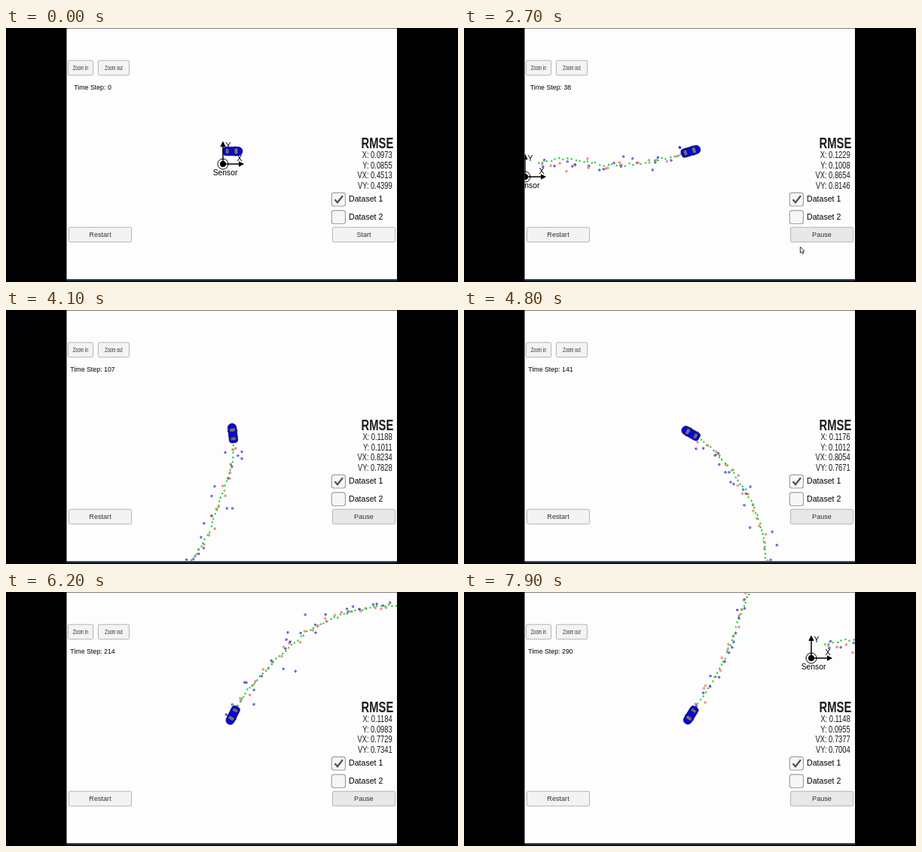
Animation of 600x338 px, one loop 8 s. Source, as an HTML page with a canvas:

```html
<!DOCTYPE html>
<html lang="en">
<head>
<meta charset="utf-8">
<title>Sensor fusion tracker</title>
<style>
html, body { margin: 0; width: 100%; height: 100%; overflow: hidden; background: #000; }
canvas { display: block; }
</style>
</head>
<body>
<canvas id="stage" width="600" height="338"></canvas>
<script>
const ctx = document.getElementById('stage').getContext('2d');
const LOOP = 8000, CAR = [301, 164], TAU = Math.PI * 2;
const SANS = '"Liberation Sans", Arial, sans-serif';

// time, step, RMSE of X, Y, VX, VY
const KEYS = [
  [1920, 0, .0973, .0855, .4513, .4399],
  [2700, 38, .1229, .1008, .8654, .8146],
  [3500, 77, .1199, .1010, .8388, .7962],
  [4800, 141, .1176, .1012, .8054, .7671],
  [6200, 214, .1184, .0983, .7729, .7341],
  [7900, 290, .1148, .0955, .7377, .7004]
];
// time, x, y
const CURSOR = [[900, 511, 287], [1100, 491, 274], [2500, 491, 274], [2800, 424, 300]];
// step, x, y of the car relative to the sensor
const PATH = [
  [0, 13, -17], [24, 143, -17], [38, 220, -34], [56, 309, -67], [77, 393, -145],
  [90, 424, -213], [105, 442, -294], [122, 415, -378], [141, 343, -454], [160, 247, -476],
  [181, 146, -451], [203, 59, -374], [214, 30, -330], [260, -83, -86], [277, -119, 9],
  [290, -160, 76]
];

function segment(rows, x) {
  let i = 0;
  while (i < rows.length - 2 && x > rows[i + 1][0]) i++;
  const a = rows[i], b = rows[i + 1];
  return [i, Math.min(1, Math.max(0, (x - a[0]) / (b[0] - a[0])))];
}

function linear(rows, x) {
  const [i, u] = segment(rows, x);
  return rows[i].slice(1).map((v, k) => v + (rows[i + 1][k + 1] - v) * u);
}

// Cubic spline through the key points
function carAt(step) {
  const [i, u] = segment(PATH, step), a = PATH[i], b = PATH[i + 1];
  const slope = (j, k) => {
    const p = PATH[Math.max(0, j - 1)], q = PATH[Math.min(PATH.length - 1, j + 1)];
    return (q[k] - p[k]) / (q[0] - p[0]);
  };
  const w = u * u * (3 - 2 * u), h = (b[0] - a[0]) * u * (1 - u);
  return [1, 2].map(k => a[k] + (b[k] - a[k]) * w + h * ((1 - u) * slope(i, k) - u * slope(i + 1, k)));
}

let seed = 7;
const random = () => (seed = (seed * 16807) % 2147483647) / 2147483647;
const gauss = s => (random() + random() + random() + random() - 2) * 1.73 * s;

// One estimate per step; lidar and radar readings alternate.
const marks = Array.from({ length: 291 }, (_, i) => {
  const [x, y] = carAt(i), lidar = i % 2 === 0;
  const settling = -8 * Math.exp(-(((i - 8) / 6) ** 2));
  const estimate = [x + gauss(.6), y + settling + gauss(.8)];
  if (lidar) return { estimate, lidar, reading: [x + gauss(3), y + gauss(3)] };
  const range = Math.hypot(x, y) + gauss(6), angle = Math.atan2(y, x) + gauss(.03);
  return { estimate, lidar, reading: [range * Math.cos(angle), range * Math.sin(angle)], spin: random() * TAU };
});

function text(str, x, y, size, { align = 'center', squash = 1, color = '#000', weight = '' } = {}) {
  ctx.save();
  ctx.translate(x, y);
  ctx.scale(squash, 1);
  ctx.font = `${weight} ${size}px ${SANS}`;
  ctx.textAlign = align;
  ctx.fillStyle = color;
  ctx.fillText(str, 0, 0);
  ctx.restore();
}

function box(x, y, w, h, r, fill, stroke, width = 1) {
  ctx.beginPath();
  ctx.roundRect(x, y, w, h, r);
  ctx.fillStyle = fill;
  ctx.fill();
  if (!stroke) return;
  ctx.strokeStyle = stroke;
  ctx.lineWidth = width;
  ctx.stroke();
}

function poly(points, fill) {
  ctx.beginPath();
  points.forEach(p => ctx.lineTo(...p));
  ctx.closePath();
  ctx.fillStyle = fill;
  ctx.fill();
}

function line(points, color, width) {
  ctx.beginPath();
  points.forEach(p => ctx.lineTo(...p));
  ctx.strokeStyle = color;
  ctx.lineWidth = width;
  ctx.stroke();
}

function ring(x, y, r, color, width) {
  ctx.beginPath();
  ctx.arc(x, y, r, 0, TAU);
  ctx.strokeStyle = color;
  ctx.lineWidth = width;
  ctx.stroke();
}

function button(label, x, y, w, fill = '#f3f3f3', squash = 1) {
  box(x + .4, y + .2, w - .8, 19.6, 2, fill, '#b2b2b2');
  text(label, x + w / 2, y + 13, 9.1, { color: '#333', squash });
}

function checkbox(label, y, checked) {
  box(432.3, y + .3, 18.2, 17.7, 3, '#f6f6f6', '#a0a0a0', 1.2);
  if (checked) line([[436.5, 228.2], [440, 232.2], [447, 223.2]], '#505050', 2.2);
  text(label, 455, y + 12.4, 10.6, { align: 'left' });
}

function drawTrail(step) {
  for (const { estimate: [ex, ey], lidar, reading: [x, y], spin } of marks.slice(1, step)) {
    ring(x, y, 1.2, lidar ? '#f22' : '#11c', .8);
    if (!lidar) line([[x, y], [x + 1.8 * Math.cos(spin), y + 1.8 * Math.sin(spin)]], '#11c', .8);
    poly([[ex - 1.5, ey + 1.2], [ex, ey - 1.6], [ex + 1.5, ey + 1.2]], '#0c1');
  }
}

function drawCar(step) {
  const [ax, ay] = carAt(step - 1), [bx, by] = carAt(step + 1);
  ctx.save();
  ctx.translate(...CAR);
  ctx.rotate(Math.atan2(by - ay, bx - ax));
  box(-12.8, -5.7, 25.8, 11.4, [4, 5.5, 5.5, 4], '#0404e0', '#0a0a50', .7);
  box(-9.8, -4, 17, 8, 3, '#1c1c60');
  box(-9.2, -3.3, 3.8, 6.6, 1.5, '#6d6c66');
  box(-5, -3.5, 7, 7, 1.5, '#0808dc');
  box(2.4, -3.7, 4.2, 7.4, 1.8, '#74736c');
  for (const side of [-1, 1]) line([[3, 6.8 * side], [4, 5 * side]], '#0a0a50', 1);
  ctx.restore();
}

function drawSensor() {
  line([[0, -24], [0, 0], [24, 0]], '#000', 1.5);
  poly([[-3.7, -23], [0, -30.5], [3.7, -23]], '#000');
  poly([[21, -3.7], [28, 0], [21, 3.7]], '#000');
  ring(0, 0, 7, '#000', 1);
  ring(0, 0, 2, '#000', 4);
  text('Y', 7, -21.3, 10.5);
  text('X', 22, -3.8, 10.5);
  text('Sensor', 3, 14.8, 10.3);
}

function drawCursor(t) {
  if (t < 900 || t > 2800) return;
  const [x, y] = linear(CURSOR, t);
  const shape = [[0, 0], [0, 8], [1.9, 6.4], [3.2, 9.2], [4.6, 8.5], [3.4, 5.9], [5.6, 5.7]]
    .map(([dx, dy]) => [x + dx, y + dy]);
  poly(shape, '#fff');
  line([...shape, shape[0]], '#222', .9);
}

function drawPanel(t, step, errors) {
  button('Zoom in', 82, 43, 34, undefined, .62);
  button('Zoom out', 122, 43, 42, undefined, .61);
  text('Time Step: ' + step, 115, 82, 8.8);
  text('RMSE', 514.3, 159.6, 20, { align: 'right', squash: .74, weight: 'bold', color: '#1c1c1c' });
  ['X', 'Y', 'VX', 'VY'].forEach((name, i) =>
    text(`${name}: ${errors[i].toFixed(4)}`, 512.7, 173.3 + 13.5 * i, 12.3,
      { align: 'right', squash: .76, color: '#1c1c1c' }));
  checkbox('Dataset 1', 219, true);
  checkbox('Dataset 2', 242.5, false);
  button('Restart', 83, 265, 84);
  const running = t >= 2000, pressed = t >= 1700;
  button(running ? 'Pause' : 'Start', 433, 265, 84, running ? '#e8e8e8' : pressed ? '#bababa' : '#f3f3f3');
}

function draw(now) {
  const t = Math.floor(now % LOOP / 100) * 100;
  const [progress, ...errors] = linear(KEYS, t < 2000 ? 0 : t);
  const step = Math.round(progress);
  const [px, py] = carAt(step);
  ctx.fillStyle = '#000';
  ctx.fillRect(0, 0, 600, 338);
  ctx.fillStyle = '#1c2733';
  ctx.fillRect(80.5, 334, 438.5, 3);

  ctx.save();
  ctx.beginPath();
  ctx.rect(80.5, .6, 438.5, 333.7);
  ctx.clip();
  ctx.fillStyle = '#fdfdfd';
  ctx.fillRect(80, 0, 440, 338);
  ctx.save();
  ctx.translate(CAR[0] - px, CAR[1] - py);
  drawTrail(step);
  ctx.restore();
  drawCar(step);
  ctx.translate(CAR[0] - px, CAR[1] - py);
  drawSensor();
  ctx.restore();

  drawPanel(t, step, errors);
  drawCursor(t);
}

const start = performance.now();
function tick() {
  draw(performance.now() - start);
  requestAnimationFrame(tick);
}
tick();
</script>
</body>
</html>
```
